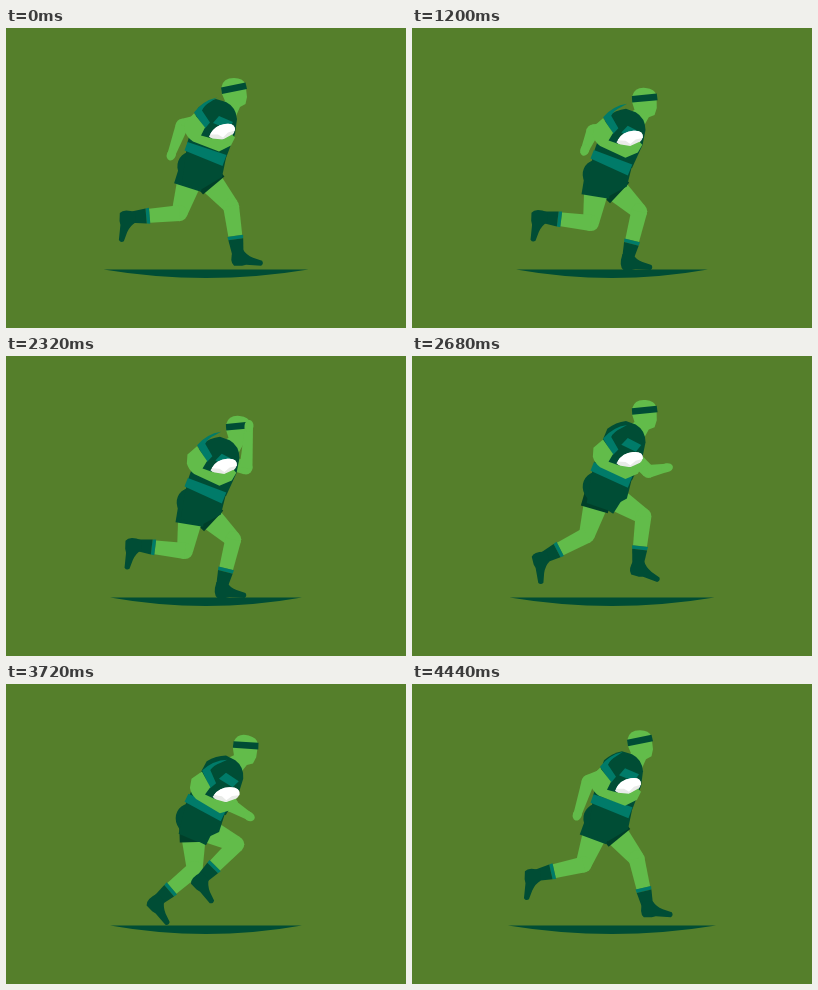
Animation of 400x300 px, one loop 4.48 s. Source, as an HTML page with a canvas:

```html
<!DOCTYPE html>
<html lang="en">
<head>
<meta charset="utf-8">
<title>Runner</title>
<style>
html, body { margin: 0; width: 100%; height: 100%; overflow: hidden; background: #557f2b; }
canvas { display: block; width: 400px; height: 300px; }
</style>
</head>
<body>
<canvas id="stage" width="400" height="300"></canvas>
<script>
const ctx = document.getElementById('stage').getContext('2d');
const { sin, cos, atan2, hypot, acos, min, max, PI } = Math;

const LOOP = 4480, STRIDE = 1120, STEP = 560, TICK = 40;
const THIGH = 42, SHANK = 50;
const GRASS = '#557f2b', SKIN = '#62bc4a', DARK = '#004d35', SHADE = '#003f29',
      TEAL = '#007b69', WHITE = '#ffffff', GREY = '#e9ebe8';

const pt = (x, y) => ({ x, y });
const mix = (a, b, k) => a + (b - a) * k;
const along = (a, b, k) => pt(mix(a.x, b.x, k), mix(a.y, b.y, k));
const clamp = (v, lo, hi) => min(hi, max(lo, v));
const wave = (t, peak, period = STEP) => cos((t - peak) / period * 2 * PI);
const smooth = (a, b, t) => {
  const k = clamp((t - a) / (b - a), 0, 1);
  return k * k * (3 - 2 * k);
};

function path(color, d) {
  ctx.fillStyle = color;
  ctx.fill(new Path2D(d));
}

function oval(color, x, y, rx, ry, turn = 0) {
  ctx.fillStyle = color;
  ctx.beginPath();
  ctx.ellipse(x, y, rx, ry, turn, 0, 2 * PI);
  ctx.fill();
}

// Tapered strip between two points; wa and wb are the end widths
function strip(color, a, b, wa, wb) {
  const len = hypot(b.x - a.x, b.y - a.y) || 1;
  const nx = (a.y - b.y) / len / 2, ny = (b.x - a.x) / len / 2;
  ctx.fillStyle = color;
  ctx.beginPath();
  ctx.moveTo(a.x + nx * wa, a.y + ny * wa);
  ctx.lineTo(b.x + nx * wb, b.y + ny * wb);
  ctx.lineTo(b.x - nx * wb, b.y - ny * wb);
  ctx.lineTo(a.x - nx * wa, a.y - ny * wa);
  ctx.fill();
}

// Closed path of the ankle over one stride
function anklePath(t) {
  const a = t / STRIDE * 2 * PI;
  return pt(172.6 + 54.2 * cos(a) + 6.9 * cos(2 * a + 0.7) - 5.9 * sin(3 * a),
            208.5 + 25 * cos(a - 0.8) + 2.5 * sin(2 * a) + 3 * cos(3 * a + 0.96));
}

// Knee that joins hip and ankle, bent forward
function kneeBetween(hip, ankle) {
  const dx = ankle.x - hip.x, dy = ankle.y - hip.y, d = hypot(dx, dy);
  const bend = acos(clamp((THIGH ** 2 + d * d - SHANK ** 2) / (2 * THIGH * d), -1, 1));
  const angle = atan2(dx, dy) + bend;
  return pt(hip.x + THIGH * sin(angle), hip.y + THIGH * cos(angle));
}

function drawLeg(t, hip, cloth) {
  const ankle = anklePath(t), knee = kneeBetween(hip, ankle);
  const cuff = along(knee, ankle, 0.6), sock = along(knee, ankle, 0.67);

  strip(SKIN, hip, knee, 27, 16);
  oval(SKIN, knee.x, knee.y, 8, 8);
  strip(SKIN, knee, cuff, 16, 14);
  strip(TEAL, cuff, sock, 16, 15);
  strip(DARK, sock, ankle, 15, 11);
  oval(DARK, ankle.x, ankle.y, 5.5, 5.5);

  // Flat on the ground, toes down while trailing
  const pitch = 46 + 46 * clamp(1.5 * wave(t, 640, STRIDE), -1, 1);
  ctx.save();
  ctx.translate(ankle.x, ankle.y);
  ctx.rotate(pitch * PI / 180);
  path(DARK, 'M-5-6L5-6Q8-1 15 2L24 5Q26 8 23 10L8 9L4 10L-4 10Q-9 6-5-6Z');
  ctx.restore();

  strip(cloth, hip, along(hip, knee, 0.36), 28, 28);
}

function drawFreeArm(t, shoulder) {
  const swing = wave(t, 540, STRIDE);
  const wipe = smooth(1720, 2040, t) * (1 - smooth(2440, 2800, t));
  const elbow = along(pt(208 + 32 * swing, 122 + 8 * swing - 17 * swing * swing),
                      pt(240, 112), wipe);
  const hand = along(pt(216 + 51 * swing, 126 - 7 * swing + 10 * wave(t, 360)),
                     pt(243, 70), wipe);
  strip(SKIN, shoulder, elbow, 15, 13);
  oval(SKIN, elbow.x, elbow.y, 6.5, 6.5);
  strip(SKIN, elbow, hand, 13, 8);
  oval(SKIN, hand.x, hand.y, 6, 4.5, atan2(hand.y - elbow.y, hand.x - elbow.x));
}

function drawHead() {
  path(SKIN, 'M216 66L215.5 59Q217 50 228 50Q237 50 239.5 56L241 69L239.5 76L234 79L230 88L208 82L219 73Z');
  path(DARK, 'M215 59.5L239.5 54.5L241 61L216 66Z');
}

function drawHips() {
  oval(DARK, 191, 140, 20, 17, 0.35);
  path(DARK, 'M181 117L220 130L216 149L196 161L176 155Z');
  path(TEAL, 'M181.5 114L220.5 127L216.5 138L178.5 122.500Z');
}

function drawJersey() {
  path(DARK, 'M192 80Q200 73 210 71L220 74Q230 79 231 91L229 106L220 130L181 116L186 98Z');
  path(TEAL, 'M207 95L213 88L227 94L222 101Z');
}

function drawBallArm() {
  path(TEAL, 'M188 84Q197 72 211 69L205 73Q198 77 196 82L204 94L199 100Z');
  path(GREY, 'M203 108Q208 97 219 95.500Q229 94 229 101Q228 108 218 111Q208 113 203 108Z');
  path(WHITE, 'M204 106Q208 97 219 95.500Q229 94 229 102L222 104L217 109L212 106Z');
  path(SKIN, 'M188 85L199 99L195 107L206 110L217 111L226 106L229 109L225 117L213 123L187 113Q181 109 179 103L179 94Z');
}

function frame(t) {
  ctx.fillStyle = GRASS;
  ctx.fillRect(0, 0, 400, 300);

  const w = 96 + 8.3 * wave(t, 500);
  path(DARK, `M${200 - w} 241.5L${200 + w} 241.5Q200 258.5 ${200 - w} 241.5Z`);

  const sway = wave(t, 260) + 0.975;
  const pivot = pt(196 - 1.5 * sway, 144.8 + 10 * wave(t, 165));
  const lean = 7.1 * sway * PI / 180;
  const stride = 6 * wave(t, 0, STRIDE);

  // Body parts are drawn upright around (196, 142) and lean from there
  const body = (draw, turn, dy = 0) => {
    ctx.save();
    ctx.translate(pivot.x, pivot.y + dy);
    ctx.rotate(turn);
    ctx.translate(-196, -142);
    draw();
    ctx.restore();
  };

  body(() => {
    ctx.translate(228, 64);
    ctx.rotate(lean * 0.5);
    ctx.translate(-228, -64);
    drawHead();
  }, lean, -2 * sway);
  drawFreeArm(t, pt(pivot.x + 6 + 60 * sin(lean), pivot.y - 50));
  drawLeg(t, pt(pivot.x - 4 + stride, pivot.y + 4), SHADE);
  drawLeg(t - STEP, pt(pivot.x - 4 - stride, pivot.y + 3), DARK);
  body(drawJersey, lean);
  body(drawHips, lean * 0.6);
  body(drawBallArm, lean, 1.5 + 5 * wave(t, 400));
}

const start = performance.now();
function run() {
  const t = (performance.now() - start) % LOOP;
  frame(Math.floor(t / TICK) * TICK);
  requestAnimationFrame(run);
}
run();
</script>
</body>
</html>
```
